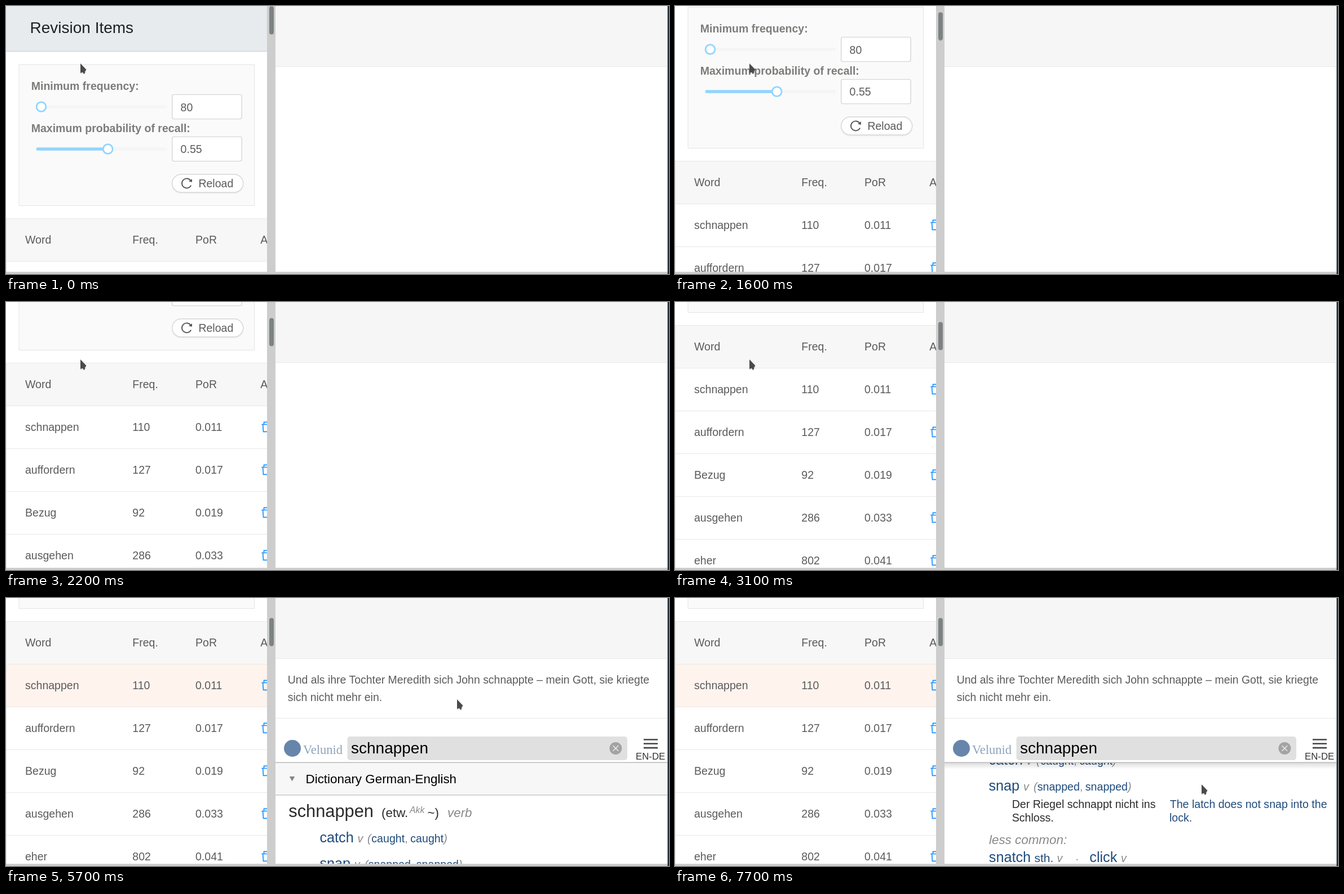
Recreate the animation shown at these times as an HTML page. Size 1176 by 476 pixels, loop 8 s.

```html
<!DOCTYPE html>
<html lang="en">
<head>
<meta charset="utf-8">
<title>Revision Items</title>
<style>
  html, body { margin: 0; width: 100%; height: 100%; overflow: hidden; background: #fff; }
  svg { display: block; width: 1176px; height: 476px; }
  text { font: 19.55px "Liberation Sans", Arial, sans-serif; fill: #5b5b5b; white-space: pre; }
  .title { font-size: 28px; fill: #1f2123; }
  .label { font-weight: bold; fill: #7c7c7a; }
  .sentence { font-size: 19.45px; }
  .line { stroke: #e8e8e8; }
  .field { fill: #fff; stroke: #d6d6d6; stroke-width: 1.4; }
  .knob { fill: #fff; stroke: #91d5ff; stroke-width: 2.8; }
  .icon { fill: none; stroke: #1890ff; stroke-width: 1.7; }

  .dict text { font-size: 19.6px; fill: #888; }
  .dict .big { font-size: 25.2px; fill: #1f4b7c; }
  .dict .mid { font-size: 22.4px; }
  .dict .blue { fill: #1f4b7c; }
  .dict .dark { fill: #2b2b2b; }
  .dict .black { fill: #000; }
  .dict .it { font-style: italic; }
  .dict .head { font-size: 30.8px; }
  .dict .query { font-size: 28px; }
  .dict .lang { font-size: 16.8px; fill: #333; }
  .dict .case { font-size: 15.8px; }
  .dict .brand { font: 22.5px "Liberation Serif", serif; fill: #8fa3bc; }
  .status text { font: 16.5px "Noto Sans", "Open Sans", sans-serif; fill: #e8e8e8; }

  .list, .thumb, .cursor, .entry, .picked, .shown, .shade, .status, .url, .wait {
    animation: 8s step-end infinite;
  }
  .list { animation-name: list; }
  .thumb { animation-name: thumb; }
  .cursor { animation-name: cursor; }
  .entry { animation-name: entry; }
  .picked { animation-name: picked; }
  .shown { animation-name: shown; }
  .shade { animation-name: shade; }
  .status { animation-name: status; }
  .url { animation-name: url; }
  .wait { animation-name: wait; }

  @keyframes list {
    0% { transform: translateY(0); }
    17.5% { transform: translateY(-24px); }
    18.75% { transform: translateY(-60px); }
    20% { transform: translateY(-102px); }
    21.25% { transform: translateY(-145px); }
    22.5% { transform: translateY(-183px); }
    23.75% { transform: translateY(-212px); }
    25% { transform: translateY(-237px); }
    26.25% { transform: translateY(-257px); }
    27.5% { transform: translateY(-269px); }
    38.75%, 100% { transform: translateY(-336px); }
  }
  @keyframes thumb {
    0% { transform: translateY(0); }
    17.5% { transform: translateY(2.5px); }
    18.75% { transform: translateY(6px); }
    20% { transform: translateY(10.5px); }
    21.25% { transform: translateY(15px); }
    22.5% { transform: translateY(19px); }
    23.75% { transform: translateY(22px); }
    25% { transform: translateY(24.5px); }
    26.25% { transform: translateY(26.5px); }
    27.5% { transform: translateY(28px); }
    38.75%, 100% { transform: translateY(35px); }
  }
  @keyframes cursor {
    0% { transform: translate(132px, 102px); }
    41.25% { transform: translate(138px, 150px); }
    42.5% { transform: translate(142px, 179px); }
    61.25% { transform: translate(320px, 152px); }
    63.75% { transform: translate(498px, 185px); }
    68.75% { transform: translate(736px, 162px); }
    71.25% { transform: translate(800px, 180px); }
    77.5% { transform: translate(926px, 142px); }
    85%, 100% { transform: translate(934px, 331px); }
  }
  @keyframes entry {
    0% { transform: translateY(0); }
    91.25% { transform: translateY(-60px); }
    93.75% { transform: translateY(-98px); }
    96.25%, 100% { transform: translateY(-138px); }
  }
  @keyframes picked { 0% { opacity: 0; } 51.25%, 100% { opacity: 1; } }
  @keyframes shown { 0% { opacity: 0; } 61.25%, 100% { opacity: 1; } }
  @keyframes shade { 0% { opacity: 0; } 91.25%, 100% { opacity: 1; } }
  @keyframes status { 0% { opacity: 0; } 51.25% { opacity: 1; } 61.25%, 100% { opacity: 0; } }
  @keyframes url { 0% { opacity: 1; } 58.75%, 100% { opacity: 0; } }
  @keyframes wait { 0% { opacity: 0; } 58.75%, 100% { opacity: 1; } }
</style>
</head>
<body>
<svg viewBox="0 0 1176 476">
  <defs>
    <clipPath id="left"><rect width="463" height="472"/></clipPath>
    <clipPath id="below"><rect x="478" y="293" width="695" height="179"/></clipPath>
    <linearGradient id="fade" x2="0" y2="1">
      <stop offset="0" stop-color="#000" stop-opacity=".13"/>
      <stop offset="1" stop-color="#000" stop-opacity="0"/>
    </linearGradient>
    <path id="bin" class="icon" d="M453.2 -11.5H470M457.5 -11.5V-15.7H465.5V-11.5M455.6 -11.5L456.5 1.3H466.6L467.5 -11.5"/>
  </defs>
  <rect width="1176" height="476" fill="#fff"/>

  <g clip-path="url(#left)">
    <g class="list">
      <rect width="463" height="80" fill="#e7ebee"/>
      <path d="M0 80.5H463" stroke="#c6c9cb"/>
      <text class="title" x="42.5" y="48">Revision Items</text>

      <rect x="23" y="104" width="417.5" height="250.5" fill="#fafafa" stroke="#e4e4e4"/>
      <text class="label" x="44.7" y="149">Minimum frequency:</text>
      <rect x="53.5" y="176.2" width="232" height="5.6" rx="2.8" fill="#f5f5f5"/>
      <circle class="knob" cx="62.5" cy="179" r="8.4"/>
      <rect class="field" x="294.7" y="157.4" width="123.4" height="43.2" rx="3"/>
      <text x="309.6" y="187">80</text>

      <text class="label" x="44.7" y="224">Maximum probability of recall:</text>
      <rect x="53.5" y="251.2" width="232" height="5.6" rx="2.8" fill="#f5f5f5"/>
      <rect x="53.5" y="251.2" width="127" height="5.6" rx="2.8" fill="#91d5ff"/>
      <circle class="knob" cx="180.7" cy="254" r="8.4"/>
      <rect class="field" x="294.7" y="232.4" width="123.4" height="43.2" rx="3"/>
      <text x="309.6" y="261">0.55</text>

      <rect x="294" y="301" width="127" height="32.5" rx="16" fill="#000" opacity=".045"/>
      <rect class="field" x="294.7" y="299" width="126" height="32" rx="16"/>
      <path d="M327.6 310.2A8.5 8.5 0 1 0 328.2 318.6" fill="none" stroke="#555" stroke-width="1.9"/>
      <path d="M330 307V312.8L324.2 311.8Z" fill="#555"/>
      <text x="341.4" y="322">Reload</text>

      <rect y="377" width="463" height="76" fill="#f7f7f7"/>
      <path class="line" d="M0 377.5H463M0.5 377V900"/>
      <text y="422"><tspan x="34">Word</tspan><tspan x="224.3">Freq.</tspan><tspan x="336">PoR</tspan><tspan x="451.2">Action</tspan></text>
      <rect class="picked" x="1" y="454" width="462" height="75" fill="#fff3ee"/>
      <g id="rows"></g>
    </g>
  </g>

  <rect x="478" width="695" height="107" fill="#f6f6f6"/>
  <path class="line" d="M478 107.5H1173"/>
  <g class="picked">
    <text class="sentence" x="499.7" y="152">Und als ihre Tochter Meredith sich John schnappte – mein Gott, sie kriegte</text>
    <text class="sentence" x="499.7" y="182.5">sich nicht mehr ein.</text>
    <path class="line" d="M478 213.5H1173"/>
  </g>

  <g class="dict shown">
    <g clip-path="url(#below)">
      <g class="entry">
        <rect x="478" y="293" width="695" height="57" fill="#f7f7f7"/>
        <path d="M478 350H1173" stroke="#c8c8c8" stroke-width="1.4"/>
        <path d="M502.8 317H512.2L507.5 325.5Z" fill="#858585"/>
        <text class="mid black" x="531.5" y="329">Dictionary German-English</text>

        <text class="head dark" x="501.3" y="389">schnappen</text>
        <text class="mid dark" x="666" y="389">(etw.</text>
        <text class="case it" x="716" y="382">Akk</text>
        <text class="mid dark" x="747.5" y="389">~)</text>
        <text class="mid it" x="783" y="389">verb</text>

        <g id="senses"></g>
        <text class="dark" x="597.7" y="511">Der Riegel schnappt nicht ins</text>
        <text class="dark" x="597.7" y="535">Schloss.</text>
        <text class="blue" x="877.7" y="511">The latch does not snap into the</text>
        <text class="blue" x="877" y="535">lock.</text>
        <text class="mid it" x="557" y="575">less common:</text>
        <text class="big" x="556.8" y="606.5">snatch</text>
        <text class="blue" style="font-size:21px" x="637.5" y="606.5">sth.</text>
        <text class="it" x="677.5" y="606.5">v</text>
        <text x="710" y="608">·</text>
        <text class="big" x="735.3" y="606.5">click</text>
        <text class="it" x="791" y="606.5">v</text>
      </g>
      <rect class="shade" x="478" y="293" width="695" height="11" fill="url(#fade)"/>
    </g>

    <circle cx="508" cy="267" r="15" fill="#6785ab"/>
    <text class="brand" x="527" y="276.5">Velunid</text>
    <rect x="605.5" y="246" width="496.5" height="42" rx="5" fill="#e0e0e0"/>
    <text class="query black" x="612" y="276">schnappen</text>
    <circle cx="1081.4" cy="267" r="11" fill="#a3a3a3"/>
    <path d="M1076.6 262.2l9.6 9.6m0 -9.6l-9.6 9.6" stroke="#ececec" stroke-width="1.5"/>
    <path d="M1131 251.5h25m-25 7.3h25m-25 7.3h25" stroke="#444" stroke-width="2.6"/>
    <text class="lang" x="1117" y="287">EN-DE</text>
    <path d="M478 292.3H1173" stroke="#b9b9b9" stroke-width="1.4"/>
  </g>

  <rect x="463" width="15" height="476" fill="#cdcdcd"/>
  <rect class="thumb" x="467" y="0.5" width="8" height="50" rx="4" fill="#7d8283"/>
  <rect y="472" width="1174" height="4" fill="#cdcdcd"/>
  <rect x="1173.5" width="2.5" height="476" fill="#1f2d35"/>

  <g class="status">
    <path d="M0 458H361Q365.5 458 365.5 462.5V476H0Z" fill="#313236"/>
    <text class="url" x="4.5" y="480">android.velunid.com</text>
    <text class="wait" x="4.5" y="480">Waiting for android.velunid.com...</text>
  </g>

  <g class="cursor">
    <path d="M0 2L10.5 13L8.5 18L6 20L4 17L0 19Z" fill="#000" opacity=".12"/>
    <path d="M0 0L10.5 11L8.2 14L7.8 17.5L6 18.5L4 15.5L0 17Z" fill="#4a4a4a"/>
  </g>
</svg>
<script>
  const words = [
    ["schnappen", "110", "0.011"],
    ["auffordern", "127", "0.017"],
    ["Bezug", "92", "0.019"],
    ["ausgehen", "286", "0.033"],
    ["eher", "802", "0.041"]
  ];
  const columns = [34, 224.3, 336];
  const text = (x, y, str, cls = "") => `<text class="${cls}" x="${x}" y="${y}">${str}</text>`;

  document.getElementById("rows").innerHTML = words.map((row, i) => {
    const top = 453.5 + 76 * i, base = 498 + 76 * i;
    return `<path class="line" d="M1 ${top}H463"/>` +
      row.map((cell, c) => text(columns[c], base, cell)).join("") +
      `<use href="#bin" y="${base}"/>`;
  }).join("");

  // verb, its past forms, and the x of: marker, bracket, first form, second form
  const sense = (y, verb, past, [v, open, first, second]) =>
    text(556.5, y, verb, "big") + text(v, y, "v", "it") + text(open, y, "(", "it") +
    `<text x="${first}" y="${y}"><tspan class="blue">${past}</tspan>,</text>` +
    `<text x="${second}" y="${y}"><tspan class="blue">${past}</tspan><tspan class="it">)</tspan></text>`;

  document.getElementById("senses").innerHTML =
    sense(434, "catch", "caught", [623.5, 641, 648.3, 717.3]) +
    sense(480, "snap", "snapped", [618, 636, 642.7, 727.8]);
</script>
</body>
</html>
```
